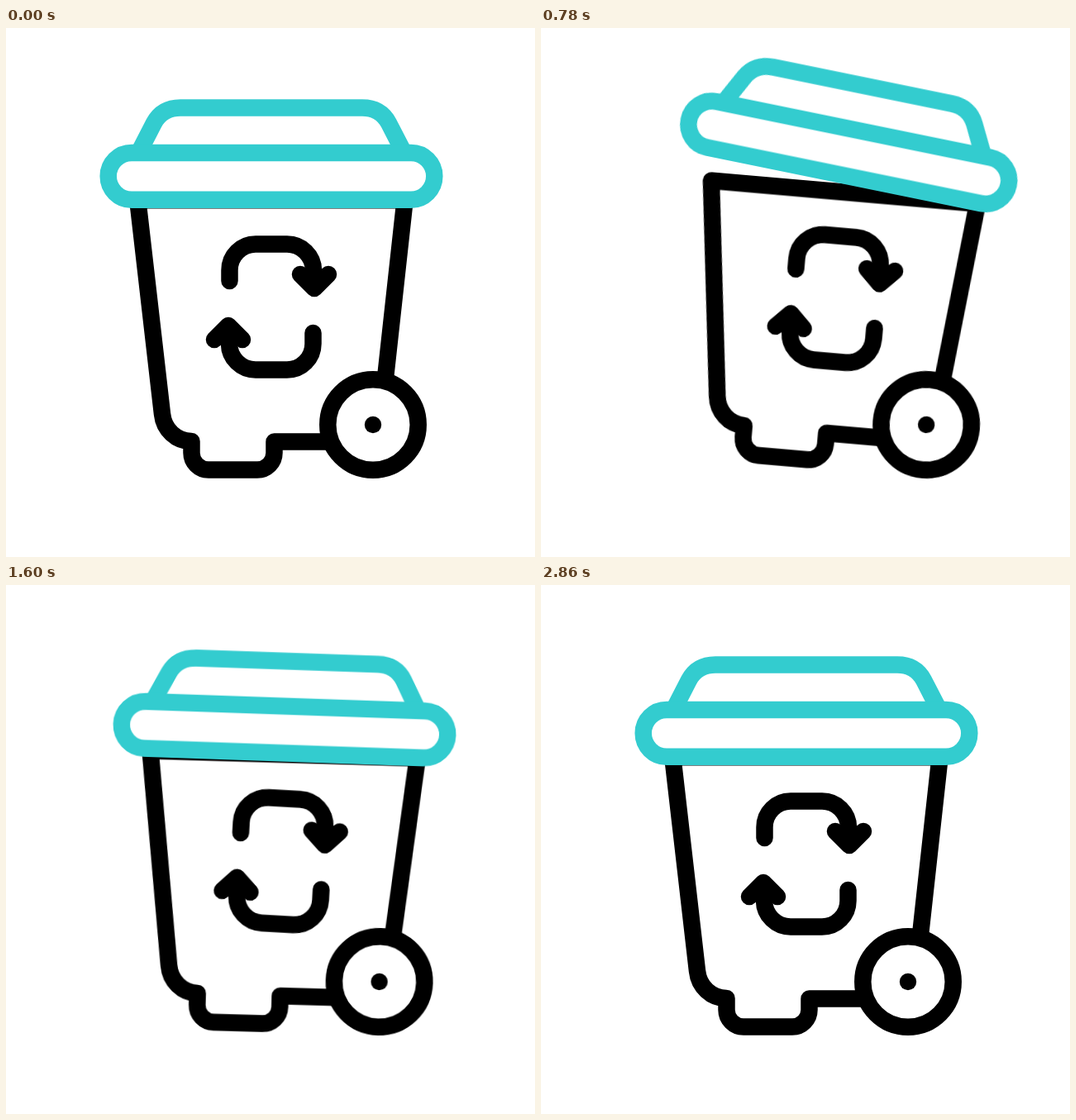
These frames come from a looping animation (640x640 px, 3.02 s). An HTML page without scripts:

```html
<!DOCTYPE html>
<html lang="en">
<head>
<meta charset="utf-8">
<title>Recycling bin</title>
<style>
  html, body { margin: 0; width: 100%; height: 100%; overflow: hidden; background: #fff; }
  svg { display: block; width: 100vw; height: 100vh; }

  .line { fill: none; stroke: #000; stroke-width: 20.5; stroke-linecap: round; stroke-linejoin: round; }
  .teal { stroke: #33cccf; }
  .white { fill: #fff; }

  .move, .tilt, .lid, .spin, .flow, .dots circle {
    animation: 3020ms cubic-bezier(.333, 0, .667, 1) infinite;
  }
  .move { animation-name: move; }
  .tilt { animation-name: tilt; transform-origin: 444px 480px; }
  .lid  { animation-name: lid;  transform-origin: 490px 179px; }
  .spin { animation-name: spin; transform-origin: 321px 337.5px; }
  .flow { animation-name: flow; stroke-dasharray: 1 3; }
  .dots circle { animation-name: puff; fill: #33cccf; transform-box: fill-box; transform-origin: center; }

  @keyframes move {
    0%, 6.8% { transform: translateX(0); }
    17.55% { transform: translateX(-22.5px); }
    29.7% { transform: translateX(36px); }
    39% { transform: translateX(0); }
    45.36% { transform: translateX(36px); animation-timing-function: cubic-bezier(.3, 0, .2, 1); }
    60.93%, 100% { transform: translateX(0); }
  }
  @keyframes tilt {
    0%, 16.92% { transform: rotate(0); }
    31.62% { transform: rotate(7.5deg); }
    39% { transform: rotate(0); }
    45.36% { transform: rotate(7.5deg); animation-timing-function: cubic-bezier(.3, 0, .2, 1); }
    60.93%, 100% { transform: rotate(0); }
  }
  @keyframes lid {
    0%, 17.28% { transform: rotate(0); }
    31.39% { transform: rotate(10deg); }
    39% { transform: rotate(0); }
    45.36% { transform: rotate(6.7deg); animation-timing-function: cubic-bezier(.3, 0, .2, 1); }
    56.13%, 100% { transform: rotate(0); }
  }
  @keyframes spin {
    0%, 51.32% { transform: rotate(0); }
    94.87%, 100% { transform: rotate(360deg); }
  }
  /* colour runs tail to head, then black follows it */
  @keyframes flow {
    0%, 53.3% { stroke-dashoffset: 1; opacity: 0; }
    53.31% { stroke-dashoffset: 1; opacity: 1; }
    72.19% { stroke-dashoffset: 0; }
    94.7% { stroke-dashoffset: -1; opacity: 1; }
    94.71%, 100% { stroke-dashoffset: -1; opacity: 0; }
  }
  @keyframes puff {
    0%, 35.43% {
      transform: translate(calc(var(--x) * 2), calc(var(--y) * 2)) scale(0);
      animation-timing-function: linear;
    }
    37.09% {
      transform: translate(var(--x), var(--y)) scale(1);
      animation-timing-function: cubic-bezier(.3, .4, .6, 1);
    }
    44.7% { transform: none; }
    47.35%, 100% { transform: scale(0); }
  }
</style>
</head>
<body>
<svg viewBox="0 0 640 640">
  <defs>
    <g id="arrow">
      <path pathLength="1" d="M270.5 306V293A31.5 31.5 0 0 1 302 261.5H340A32 32 0 0 1 372 293V312"/>
      <path pathLength="1" d="M356 298L373 315L390 298"/>
    </g>
    <g id="arrows">
      <use href="#arrow"/>
      <use href="#arrow" transform="rotate(180 321 337.5)"/>
    </g>
  </defs>

  <g class="dots">
    <circle cx="58" cy="118" r="10.5" style="--x:44px;--y:19px"/>
    <circle cx="51.5" cy="177" r="10.5" style="--x:46px;--y:0px"/>
    <circle cx="58" cy="246" r="10.5" style="--x:43px;--y:-24px"/>
  </g>

  <g class="move">
    <g class="tilt">
      <path class="line" d="M458.5 428L482.6 208.3H159.3L189 467C191 486 206 500 224.5 500V514A20.5 20.5 0 0 0 245 534.5H304A20.5 20.5 0 0 0 324.5 514V500.5H390"/>
      <g class="spin">
        <g class="line"><use href="#arrows"/></g>
        <g class="line teal flow"><use href="#arrows"/></g>
      </g>
      <g class="lid">
        <path class="line teal white" d="M162 148L179 115C186 102 197 96.5 211 96.5H431C445 96.5 456 102 463 115L480 148"/>
        <rect class="line teal white" x="123.7" y="151" width="394.6" height="56.7" rx="28.35"/>
      </g>
      <circle class="line white" cx="444" cy="480" r="54.7"/>
      <circle cx="444" cy="480" r="10.2"/>
    </g>
  </g>
</svg>
</body>
</html>
```
